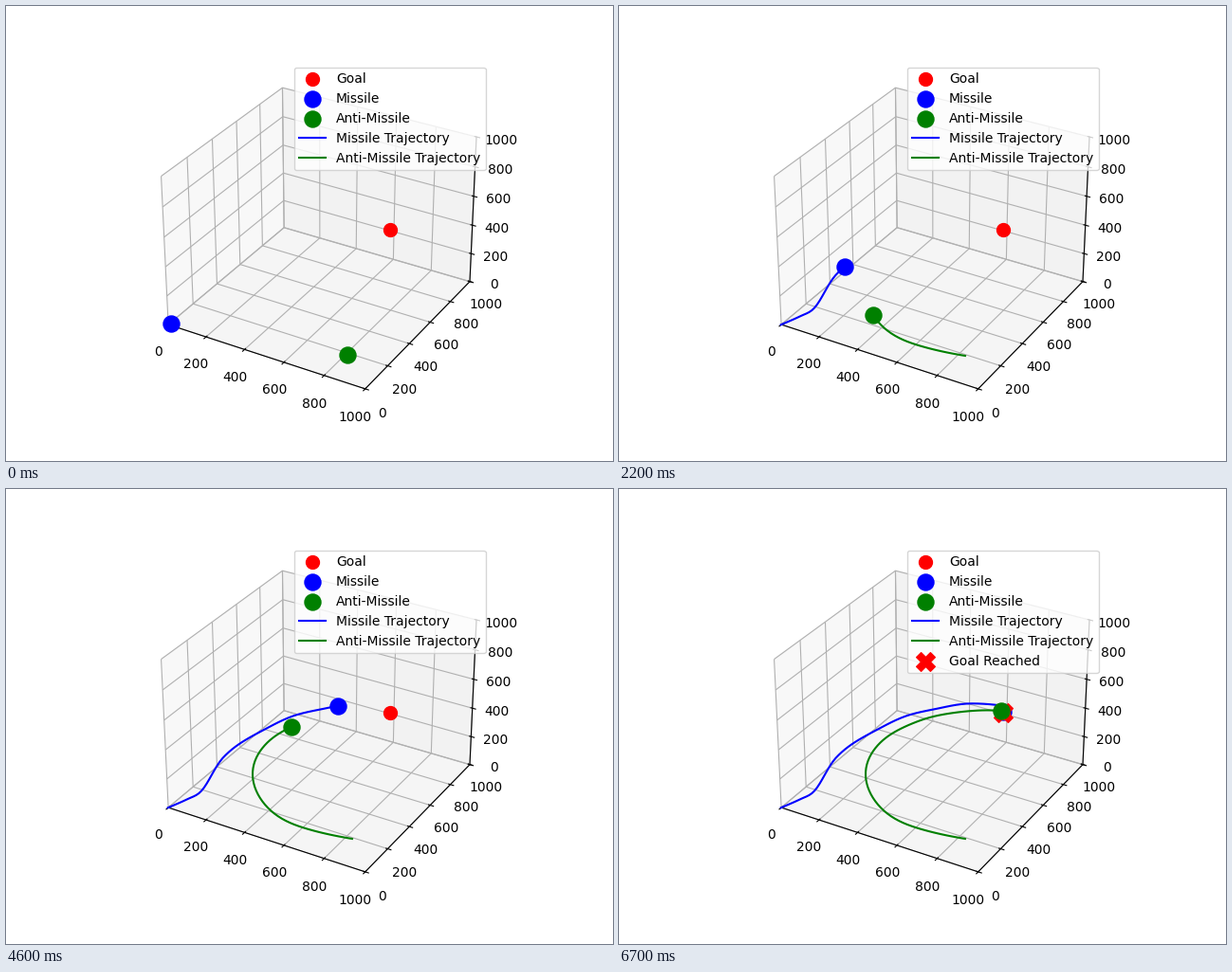
Recreate the animation shown at these times as a matplotlib script. Size 640 px wide and 480 px high, loop 10000 ms.

```python
import numpy as np
import matplotlib.pyplot as plt
from matplotlib.animation import FuncAnimation

W, H, DPI = 640, 480, 100
FRAMES, INTERVAL = 100, 100
HIT = 67                      # step at which the goal is reached
GOAL = (405.3, 236.3)
ANTI_START = (365, 369)

# Key points of the missile's flight: step, stage x, stage y
MISSILE = [
    (-1, 170.7, 336.3), (6, 191.5, 327.1), (10, 203.4, 321),
    (19.2, 229, 283.3), (31, 273.3, 253.3), (37, 302.3, 239.6),
    (43, 334.5, 231.9), (49.3, 368, 226.4), (55, 400.3, 228.2),
    (59, 405, 230.8), (67, 404.7, 235.3),
]


def fly(knots, steps):
    """Smooth cubic flight through the key points, one row per step."""
    t, *coords = np.array(knots).T
    i = np.clip(np.searchsorted(t, steps, side="right") - 1, 0, len(t) - 2)
    h = t[i + 1] - t[i]
    u = (steps - t[i]) / h
    ease = u * u * (3 - 2 * u)
    path = []
    for p in coords:
        m = np.gradient(p, t)
        bend = u * (1 - u) * ((1 - u) * m[i] - u * m[i + 1])
        path.append(p[i] + ease * (p[i + 1] - p[i]) + h * bend)
    return np.column_stack(path)


def chase(start, prey, steps):
    """Always head for the prey; perspective slows the climb."""
    speeds = np.interp(steps, [15, 27, 43, 48], [4.83, 4.0, 3.7, 5.0])
    path = [np.array(start, float)]
    for speed, aim in zip(speeds, prey[:-1]):
        gap = aim - path[-1]
        path.append(path[-1] + gap * min(1, speed / np.hypot(*gap)))
    return np.array(path)


steps = np.arange(-1, HIT + 1)
missile_path = fly(MISSILE, steps)
anti_path = chase(ANTI_START, missile_path, steps)

fig = plt.figure(figsize=(W / DPI, H / DPI), dpi=DPI)
box = fig.add_subplot(projection="3d")
box.set(xlim=(0, 1000), ylim=(0, 1000), zlim=(0, 1000))

# Flat layer in stage pixels, on top of the 3D box
sky = fig.add_axes([0, 0, 1, 1])
sky.set(xlim=(0, W), ylim=(H, 0))
sky.axis("off")


def dot(color, size, label, z, marker="o"):
    return sky.scatter(*GOAL, s=size, c=color, marker=marker, label=label, zorder=z)


def trail(color, label):
    return sky.plot([], [], color=color, label=label, zorder=2)[0]


goal = dot("red", 100, "Goal", 4)
missile = dot("blue", 150, "Missile", 3)
anti = dot("green", 150, "Anti-Missile", 5)
missile_line = trail("blue", "Missile Trajectory")
anti_line = trail("green", "Anti-Missile Trajectory")
reached = dot("red", 200, "Goal Reached", 4, "X")

handles = [goal, missile, anti, missile_line, anti_line]
flights = [(missile, missile_line, missile_path), (anti, anti_line, anti_path)]


def update(n):
    for head, line, path in flights:
        flown = path[:n + 2]
        line.set_data(*flown.T)
        head.set_offsets(flown[-1])
    done = n >= HIT
    reached.set_visible(done)
    box.legend(handles=handles + [reached] * done, loc="upper right")


anim = FuncAnimation(fig, update, frames=FRAMES, init_func=lambda: update(0),
                     interval=INTERVAL, repeat=True, repeat_delay=0)
plt.show()
```
